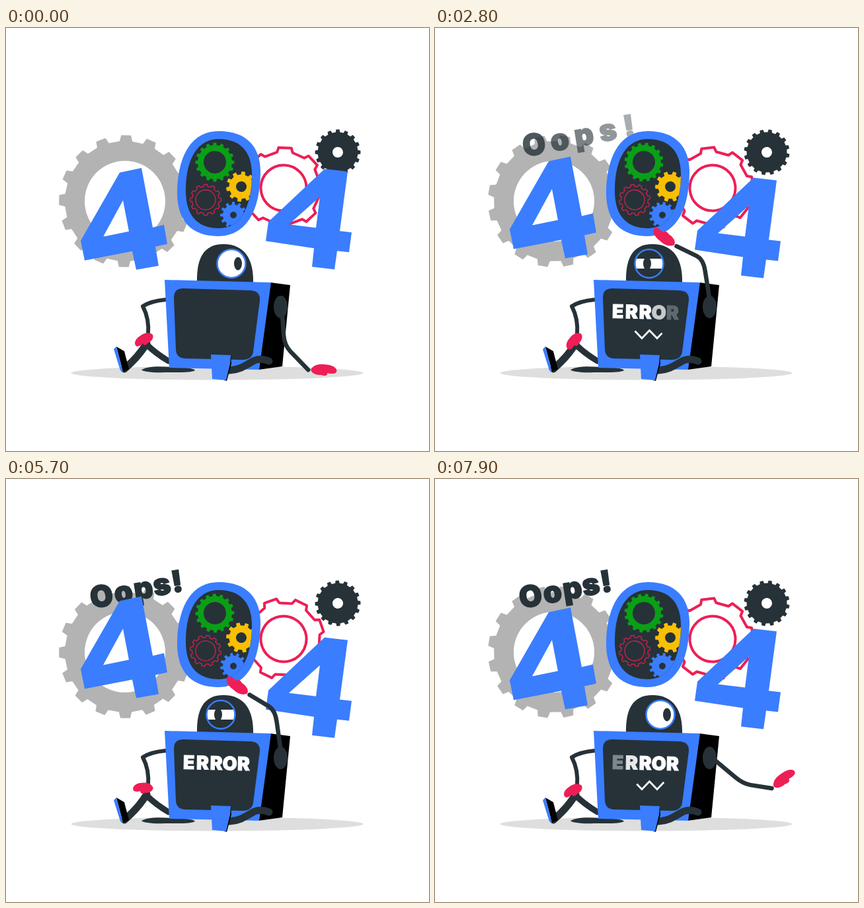
Write an HTML page that moves like this. It is 640 px wide and 640 px high and loops after 8 s.

```html
<!DOCTYPE html>
<html lang="en">
<head>
<meta charset="utf-8">
<title>404</title>
<style>
  html, body { margin: 0; width: 100%; height: 100%; overflow: hidden; background: #fff; }
  svg { display: block; width: 100%; height: 100%; }
  text { font-family: Inter, "Open Sans", "Liberation Sans", sans-serif; font-weight: 900; text-anchor: middle; }
  .blue { fill: #3a7dff; }
  .dark { fill: #263238; }
  .pink { fill: #ed1f56; }
  .limb { fill: none; stroke: #263238; stroke-linecap: round; stroke-linejoin: round; }
</style>
</head>
<body>
<svg viewBox="0 0 640 640">
  <defs>
    <path id="hand" class="pink" d="M-20-1C-16-8-8-10 2-9C11-9 20-5 19 1C18 5 11 5 5 4C6 8 0 9-4 7C-11 8-20 5-20-1Z"/>
    <path id="core" d="M322 168C357 168 373 190 372 224C371 270 356 303 322 303C290 303 271 284 272 243C273 197 290 168 322 168Z"/>
    <clipPath id="coreClip"><use href="#core"/></clipPath>
    <clipPath id="eyeClip"><circle r="21"/></clipPath>
  </defs>

  <ellipse cx="319.500" cy="522" rx="221" ry="10.500" fill="#dedede"/>
  <g id="backGears"></g>
  <g id="oops" class="dark" font-size="45" stroke="#263238" stroke-width="1.600"></g>
  <path id="leftFour" class="blue" fill-rule="evenodd" d="M172 219L205 212L222 302L239 298L244 327L226 331L231 360L197 366L191 338L119 352L113 322ZM177 261L186 308L147 316Z"/>
  <path id="rightFour" class="blue" fill-rule="evenodd" d="M482 213L517 217L505 307L523 309L519 339L501 337L497 365L463 361L466 333L393 322L397 293ZM475 255L469 302L428 297Z"/>

  <path class="blue" d="M322 156C366 156 386 182 385 220C384 275 365 315 320 315C278 314 258 290 259 245C261 190 282 156 322 156Z"/>
  <use href="#core" class="dark"/>
  <g id="coreGears" clip-path="url(#coreClip)"></g>

  <path class="dark" d="M289 386C288 350 298 327 329 327C361 327 375 350 374 386Z"/>
  <g id="eye">
    <circle r="21" class="dark"/>
    <g clip-path="url(#eyeClip)">
      <rect id="eyeOpening" x="-22" width="44" fill="#fff"/>
      <ellipse id="pupil" class="dark" rx="6" ry="10"/>
    </g>
    <circle r="21.500" fill="none" stroke="#3a7dff" stroke-width="2.500"/>
  </g>

  <path class="dark" d="M205 517C220 510 235 513 250 513C270 513 285 515 286 518C280 522 255 521 240 521C225 522 207 520 205 517Z"/>
  <path class="limb" stroke-width="11" stroke-linecap="butt" d="M179 516Q200 498 213 477"/>
  <path class="limb" stroke-width="9" d="M213 479Q226 492 246 504"/>
  <path class="limb" stroke-width="6" d="M242 411Q219 413 207 421Q217 440 215 464"/>
  <path d="M167 482L179 489L186 516L177 520Z"/>
  <path class="blue" d="M163 486L167 482L177 520L173 518Z"/>
  <use id="leftHand" href="#hand"/>

  <path d="M400 385L430 389L418 512L382 517Z"/>
  <path class="blue" d="M240 381L401 385L383 517L247 514Z"/>
  <path class="dark" d="M268 394L370 397Q385 398 384 412L374 490Q372 502 358 502L270 500Q258 499 257 487L254 408Q254 394 268 394Z"/>
  <g id="error" fill="#fff" font-size="28.500" stroke="#fff" stroke-width="1"></g>
  <path id="mouth" fill="none" stroke="#fff" stroke-width="2.800"/>
  <path class="limb" stroke-width="11" stroke-linecap="butt" d="M338 518C356 517 366 508 376 503Q386 499 398 504"/>
  <path d="M340 495L341 508L334 534L330 533Z"/>
  <path class="blue" d="M310 494L340 495L339 508L333 533L312 531Z"/>

  <ellipse class="dark" cx="415.500" cy="422" rx="10.500" ry="17"/>
  <path id="arm" class="limb" stroke-width="6.500"/>
  <use id="rightHand" href="#hand"/>
</svg>
<script>
const LOOP = 8000, STEP = 100;
const CYCLE = 10.2; // seconds per gear turn and per rise and fall of the digits
const $ = id => document.getElementById(id);
const clamp = v => Math.min(1, Math.max(0, v));
const rad = deg => deg * Math.PI / 180;
const mix = (a, b, k) => a + (b - a) * k;
const mixPoint = (p, q, k) => [mix(p[0], q[0], k), mix(p[1], q[1], k)];
const polar = ([x, y], r, deg) => [x + r * Math.cos(rad(deg)), y + r * Math.sin(rad(deg))];

function add(parent, tag, attrs, content = "") {
  const el = document.createElementNS("http://www.w3.org/2000/svg", tag);
  for (const name in attrs) el.setAttribute(name, attrs[name]);
  el.textContent = content;
  parent.appendChild(el);
  return el;
}

// Interpolates rows of [seconds, value, value, ...].
function track(rows, t) {
  let i = 0;
  while (i < rows.length - 2 && t > rows[i + 1][0]) i++;
  const a = rows[i], b = rows[i + 1], k = clamp((t - a[0]) / (b[0] - a[0]));
  return a.slice(1).map((v, n) => mix(v, b[n + 1], k));
}

const circlePath = r => `M${r} 0A${r} ${r} 0 1 0 ${-r} 0A${r} ${r} 0 1 0 ${r} 0Z`;

function gearPath({ teeth, outer, body, hole, tip = 0.38, base = 0.54 }) {
  const pitch = 360 / teeth, points = [];
  for (let i = 0; i < teeth; i++) {
    const mid = i * pitch - 90;
    for (const [r, side] of [[body, -base], [outer, -tip], [outer, tip], [body, base]])
      points.push(polar([0, 0], r, mid + side * pitch / 2).map(v => v.toFixed(2)));
  }
  return `M${points.join("L")}Z${circlePath(hole)}`;
}

const gears = [
  { x: 180, y: 262, teeth: 16, outer: 100, body: 91, hole: 61, color: "#b3b3b3", start: 1, turn: 1 },
  { x: 420, y: 242, teeth: 8, outer: 61.5, body: 55, hole: 34.5, color: "#ed1f56", line: 4, tip: 0.4, base: 0.55, start: 2, turn: -1 },
  { x: 502, y: 188, teeth: 16, outer: 34.5, body: 30.5, hole: 8, color: "#263238", start: 0, turn: 1 },
  { x: 316, y: 203, teeth: 16, outer: 29.5, body: 26, hole: 17, color: "#0a9f16", start: 0, turn: 1, core: true },
  { x: 302, y: 260, teeth: 12, outer: 23.5, body: 20.5, hole: 15, color: "#d02050", line: 1.3, start: 0, turn: -1, core: true },
  { x: 356, y: 240, teeth: 10, outer: 23, body: 18.5, hole: 8, color: "#f9bf04", start: 8, turn: -1, core: true },
  { x: 344, y: 283, teeth: 12, outer: 20, body: 16, hole: 5, color: "#3a7dff", start: 0, turn: 1, core: true }
];
for (const gear of gears) {
  const paint = gear.line
    ? { fill: "none", stroke: gear.color, "stroke-width": gear.line, "stroke-linejoin": "round" }
    : { fill: gear.color, "fill-rule": "evenodd" };
  gear.el = add($(gear.core ? "coreGears" : "backGears"), "path", { d: gearPath(gear), ...paint });
}

const oopsX = [147, 180, 210, 238, 261];
const oops = [..."Oops!"].map(c => add($("oops"), "text", {}, c));
const error = [..."ERROR"].map((c, i) =>
  add($("error"), "text", { transform: `translate(${276.5 + i * 20.7} ${439 + i * 0.5}) rotate(1)` }, c));

const MOUTH_START = 267, MOUTH_END = 360, MOUTH_DASH = 41;
const mouthY = x => {
  const phase = ((x - MOUTH_START) / 23) % 1;
  return 469.5 - 12 * (1 - Math.abs(1 - 2 * phase));
};

const mouthTrack = [[0.7, 0], [1.1, 28], [2.1, 56], [2.85, 78], [4.9, 132]];
// eye x, pupil x, half height of the lid opening
const eyeTrack = [[0, 341, 351, 22], [1.1, 327.5, 327.5, 22], [2.8, 324, 321, 7.5], [4.6, 324, 319, 7.5],
  [5.7, 325, 321, 7.5], [7.1, 337, 340, 14], [7.9, 341, 351, 22]];
const tapTrack = [[0, 0], [1.1, 0], [2.8, -18], [4.6, 0], [5.7, 28], [7.1, 0], [8, 0]];
// upper arm angle and length, forearm angle and length, hand angle
const armTrack = [[0, 86, 60, 46, 52, 2], [1.1, -4, 58, -16, 44, 12], [2.8, -99, 71, -154, 45, -142],
  [4.6, -101, 71, -156, 45, -142], [5.7, -98, 71, -149, 45, -142],
  [7.1, -67.6, 68, -120, 47, -152], [7.9, 40, 64, 9, 44, -37]];

function drawMouth(t) {
  const [head] = track(mouthTrack, t % 5);
  const from = MOUTH_START + Math.max(0, head - MOUTH_DASH);
  const to = Math.min(MOUTH_END, MOUTH_START + head);
  const points = [];
  if (to > from) {
    points.push([from, mouthY(from)]);
    for (let x = MOUTH_START; x <= MOUTH_END; x += 11.5)
      if (x > from && x < to) points.push([x, mouthY(x)]);
    points.push([to, mouthY(to)]);
  }
  $("mouth").setAttribute("d", points.length ? `M${points.join("L")}` : "");
}

function drawArm(t) {
  const [upper, upperLength, fore, foreLength, hand] = track(armTrack, t);
  const shoulder = [417, 420];
  const elbow = polar(shoulder, upperLength, upper);
  const wrist = polar(elbow, foreLength, fore);
  const palm = polar(wrist, 24, hand);
  $("arm").setAttribute("d",
    `M${shoulder}L${mixPoint(shoulder, elbow, 0.75)}Q${elbow} ${mixPoint(elbow, wrist, 0.25)}L${wrist}`);
  $("rightHand").setAttribute("transform", `translate(${palm}) rotate(${hand})`);
}

function draw(t) {
  for (const g of gears)
    g.el.setAttribute("transform", `translate(${g.x} ${g.y}) rotate(${g.start + g.turn * 360 * t / CYCLE})`);

  const lift = (1 - Math.cos(2 * Math.PI * (t - 0.25) / CYCLE)) / 2;
  $("leftFour").setAttribute("transform", `translate(0 ${-35 * lift})`);
  $("rightFour").setAttribute("transform", `translate(0 ${27 * lift})`);

  oops.forEach((el, i) => {
    const shown = clamp((t - 0.85 - 0.25 * i) / 2.4);
    const x = oopsX[i] + 78 * (1 - shown) ** 1.6;
    const y = 193 - (x - 147) * 0.195;
    el.setAttribute("transform", `translate(${x} ${y}) rotate(-9)`);
    el.setAttribute("opacity", shown);
  });
  error.forEach((el, i) => {
    const delay = 0.57 * i;
    el.setAttribute("opacity", clamp((t - 0.2 - delay) / 1.2) - clamp((t - 7.2 - delay) / 1.2));
  });

  const [eyeX, pupilX, open] = track(eyeTrack, t);
  $("eye").setAttribute("transform", `translate(${eyeX} 356.500)`);
  $("pupil").setAttribute("cx", pupilX - eyeX);
  $("eyeOpening").setAttribute("y", -open);
  $("eyeOpening").setAttribute("height", 2 * open);

  const [tap] = track(tapTrack, t);
  $("leftHand").setAttribute("transform", `translate(216 467) rotate(${tap - 30}) translate(-9 1) scale(-.78 .95)`);

  drawMouth(t);
  drawArm(t);
}

const origin = performance.now();
function tick() {
  const ms = (performance.now() - origin) % LOOP;
  draw(Math.floor(ms / STEP) * STEP / 1000);
  requestAnimationFrame(tick);
}
tick();
</script>
</body>
</html>
```
